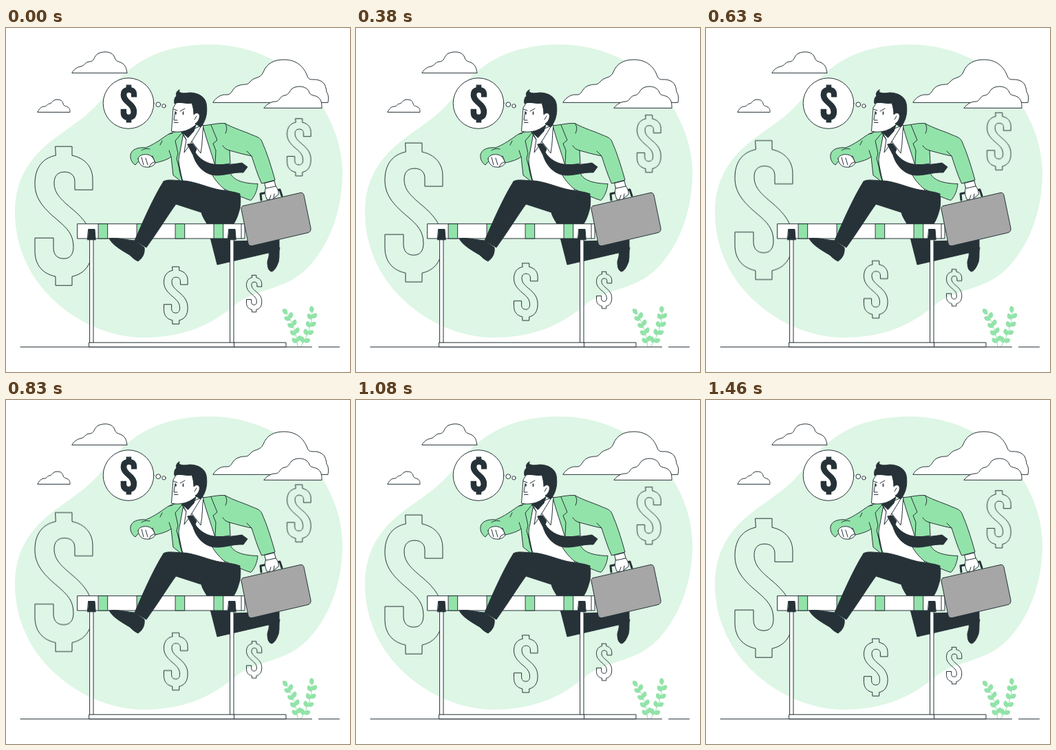
An HTML page for the animation above (1.5 s loop, 500 by 500 pixels).

```html
<!DOCTYPE html>
<html lang="en">
<head>
<meta charset="utf-8">
<title>Over the hurdle</title>
<style>
  html, body { margin: 0; width: 100%; height: 100%; overflow: hidden; background: #fff; }
  svg { display: block; width: 100vw; height: 100vh; }
  .line { stroke: #263238; stroke-linejoin: round; stroke-linecap: round; fill: none; }
  .white { fill: #fff; }
  .green { fill: #92e3a9; }
  .dark { fill: #263238; }
  .grey { fill: #a6a6a6; }
  .soft { fill: #def6e5; }
  /* 24 pictures a second, 18 up and 18 down */
  .float { animation: float 1500ms steps(18, jump-none) -4ms infinite; }
  @keyframes float {
    0%, 100% { transform: translateY(0); }
    50% { transform: translateY(-9.714px); }
  }
</style>
</head>
<body>
<svg viewBox="0 0 500 500">
  <defs>
    <path id="dollar" vector-effect="non-scaling-stroke" d="M30 0H54V13C73 17 84 30 84 48V63H58V51C58 42 52 37 43 37C33 37 28 43 28 53C28 68 38 77 52 89C74 107 84 122 84 145C84 170 73 185 54 189V202H30V189C11 185 0 172 0 152V133H27V147C27 157 32 163 42 163C51 163 56 157 56 146C56 128 47 119 33 107C10 88 0 74 0 54C0 31 11 17 30 13Z"/>
    <path id="leaf" d="M0 0C1 -4 6 -6 10 -2C9 3 4 4 0 0Z"/>
  </defs>

  <path class="soft" d="M13 268C13 228 28 196 60 169C92 143 119 130 142 100C170 63 210 24 296 24C356 24 413 50 448 97C476 134 489 174 489 211C489 268 468 319 437 350C405 381 370 377 337 399C299 432 258 450 200 450C151 450 97 427 58 384C28 351 13 309 13 268Z"/>

  <g id="plant" class="green"></g>

  <g class="line white">
    <path d="M96 65C98 61 103 57 108 56C115 55 115 49 121 49C129 49 127 41 134 37C143 33 155 34 158 43C160 50 165 48 170 52C175 56 175 61 176 65Z"/>
    <path d="M46 122C48 118 51 114 56 114C60 114 59 110 64 110C67 109 68 104 74 104C80 104 82 106 83 110C84 114 87 113 90 115C93 117 93 120 93 122Z"/>
    <path d="M301 108C305 101 313 96 320 97C330 98 327 86 340 83C347 81 350 84 355 78C360 71 370 74 374 64C379 51 390 46 404 46C422 46 433 56 438 70C441 78 447 73 455 76C464 79 465 86 466 93C469 97 469 103 468 108Z"/>
    <path d="M375 116C379 111 385 107 391 107C399 107 397 99 405 98C413 97 411 89 420 86C430 83 439 87 441 94C443 99 449 97 454 101C459 105 459 111 459 116Z"/>
  </g>

  <g class="float line">
    <use href="#dollar" transform="translate(42 172.2)"/>
    <use href="#dollar" transform="translate(408.5 131.7) scale(.412)"/>
    <use href="#dollar" transform="translate(229.5 347) scale(.412)"/>
    <use href="#dollar" transform="translate(349.5 359.3) scale(.265)"/>
  </g>

  <g class="line white">
    <circle cx="178" cy="109.5" r="36.8"/>
    <circle cx="221.3" cy="111.2" r="3.4"/>
    <circle cx="229.5" cy="113.3" r="2.7"/>
  </g>
  <use href="#dollar" class="dark" stroke="#263238" stroke-width="1.3" transform="translate(167.3 83.2) scale(.265)"/>

  <!-- back leg -->
  <g class="line dark">
    <path d="M283 262L340 240C343 258 337 276 330 286L328 310L397 308V319L385 326L307 344L292 285Z"/>
    <path d="M381 323L398 319C396 325 398 332 396 340C393 348 390 353 386 354C381 353 380 346 380 340C381 334 384 330 381 323Z"/>
  </g>

  <!-- hurdle -->
  <g class="line white">
    <path d="M122 306H127V458H122ZM326 306H331V458H326Z"/>
    <path d="M121 457.200H407V463.700H121ZM331.500 457.200V463.700"/>
    <path d="M104 284.700H347V306H104ZM342 284.700V306"/>
    <path class="green" d="M134.500 284.700h13.200v21.300h-13.200zm56 0h13.200v21.300h-13.200zm56 0h13.200v21.300h-13.200zm56 0h13.200v21.300h-13.200z"/>
    <path class="dark" d="M120 292.500h9l1.200 15.300h-11.500zm204 0h9l1.200 15.300h-11.500z"/>
    <path d="M21 463.700H444.500M454.500 463.700H484.500"/>
  </g>

  <!-- shirt and jacket -->
  <g class="line">
    <path class="white" d="M257 156L250 190L257 226L320 242L307 205L300 165L286 141L270 148Z"/>
    <path class="green" d="M299 212L326 211C331 222 346 226 366 226.500C365 236 362 244 356 250.500C346 248 331 240 317 234C309 227 303 220 299 212Z"/>
    <path class="green" d="M258 150C248 149 239 152 232 157C221 165 211 171 203 174C192 173 183 176 181 184C180 191 184 197 188 199L194 192L213 186L217 196C226 194 236 191 240 187L243 214L257 225C251 208 249 194 253 180Z"/>
    <path d="M257 151L246 164L250 182L248 190L257 223M240 187L237 178M237 154L242 153M197 178C201 175 205 175 209 176M227 164L224 170"/>
    <path class="white" d="M192 190C193 185 199 183 206 184C212 185 216 191 216.500 197C214 201 208 203 203 202C198 202 193 198 192 190ZM197 188L200 199M203 189L206 199M208 202L211 197L215 195"/>

    <path class="green" d="M286 142C297 141 307 138 318 138.500C331 146 349 151 358 155.500C365 158 370 160 372 165C380 183 386 203 391 221L371.500 226C365 212 361 198 357 186C346 184 336 181 325 178L326 197L304 200C298 180 291 161 286 142Z"/>
    <path d="M298 141L307 163L301 168L305 178L304 198M318 138.500C321 142 322 147 319 153M325 178C320 177 317 174 315 171M357 186L350 179"/>
  </g>

  <!-- neck, collar, tie -->
  <g class="line dark">
    <path d="M254 149L276 141L273 150L262 162Z"/>
    <path class="white" d="M257 153L262 162L259 181L267 170L284 142L287 141C285 154 286 168 283 182L270 165"/>
    <path d="M264 169L271 168L277 176L275 181C282 191 292 198 307 198.500C321 199 332 198 343 196L351 202L345 210C329 209 315 216 300 213.500C285 210 276 198 272 185Z"/>
  </g>

  <!-- head -->
  <g class="line">
    <path class="white" d="M252 101L243 116L240.500 150C247 152 255 151 262 149C270 146 276 141 281 136L284 115L270 102Z"/>
    <path class="dark" d="M252 90C249 91 246 95 248 99C245 100 244 106 245 110C252 106 262 111 270 109C272 114 273 121 273 126C277 121 283 124 281 131C280 135 277 138 275 139L283 144C289 137 293 126 291.500 113C291 100 279 94 267 94C260 95 256 95 254 94C252 94 251 92 252 90Z"/>
    <path d="M246 121L244 134L249 134M244.500 137.500H250M243.500 118L249 120M253 121L260 117M277 128L274 133"/>
    <path d="M247 122.500v2.500M257.500 122v3.500" stroke-width="1.6"/>
  </g>

  <!-- front leg -->
  <g class="line dark">
    <path d="M229 223C235 219 246 222 258 222C275 223 296 233 312 235.500C323 237 332 238 340 241L340 262L330 284L292 284C288 278 285 273 284 268L247 256C236 271 224 291 204 319L187 309C200 279 214 247 229 223Z"/>
    <path d="M150 306C161 304 174 308 187 309L201 319C202 327 199 334 192 339C187 337 183 333 180 330C170 324 155 316 150 306Z"/>
  </g>

  <!-- hand and briefcase -->
  <g class="line">
    <path d="M371 250L370 241L398 235L401 244" stroke-width="3"/>
    <path class="white" d="M378 230C375 239 377 243 379 249L386 250L396 242C397 237 394 232 391 228Z"/>
    <path class="white" d="M376 225.500L390 222L392 230L378 233Z"/>
    <path d="M383 249L385 243M389 247L390 241"/>
    <path class="grey" d="M345 258.500L428 239.500Q432 239 433 243L443 291Q443.500 296 439 297.500L358 316.500Q353 317 352 313L342 263Q341.500 259.500 345 258.500Z"/>
  </g>
</svg>
<script>
  const plant = document.getElementById('plant');
  const add = (name, attrs) => {
    const el = document.createElementNS('http://www.w3.org/2000/svg', name);
    for (const key in attrs) el.setAttribute(key, attrs[key]);
    plant.append(el);
  };
  const mix = (a, b, t) => a + (b - a) * t;

  // a curved stem with leaves in pairs and one at the tip
  function sprig(p, q, r) {
    add('path', { d: `M${p}Q${q} ${r}`, fill: 'none', stroke: '#92e3a9' });
    const leaf = (t, turn) => {
      const [x, y] = [0, 1].map(i => mix(mix(p[i], q[i], t), mix(q[i], r[i], t), t));
      const [dx, dy] = [0, 1].map(i => mix(q[i] - p[i], r[i] - q[i], t));
      const angle = Math.atan2(dy, dx) * 180 / Math.PI + turn;
      add('use', { href: '#leaf', transform: `translate(${x} ${y}) rotate(${angle}) scale(1 ${turn < 0 ? -1 : 1})` });
    };
    for (let i = 0; i < 4; i++) {
      leaf(.12 + i * .23, -50);
      leaf(.16 + i * .23, 50);
    }
    leaf(1, 0);
  }
  sprig([424, 464], [422, 438], [409, 416]);
  sprig([428, 464], [444, 440], [445, 414]);
</script>
</body>
</html>
```
